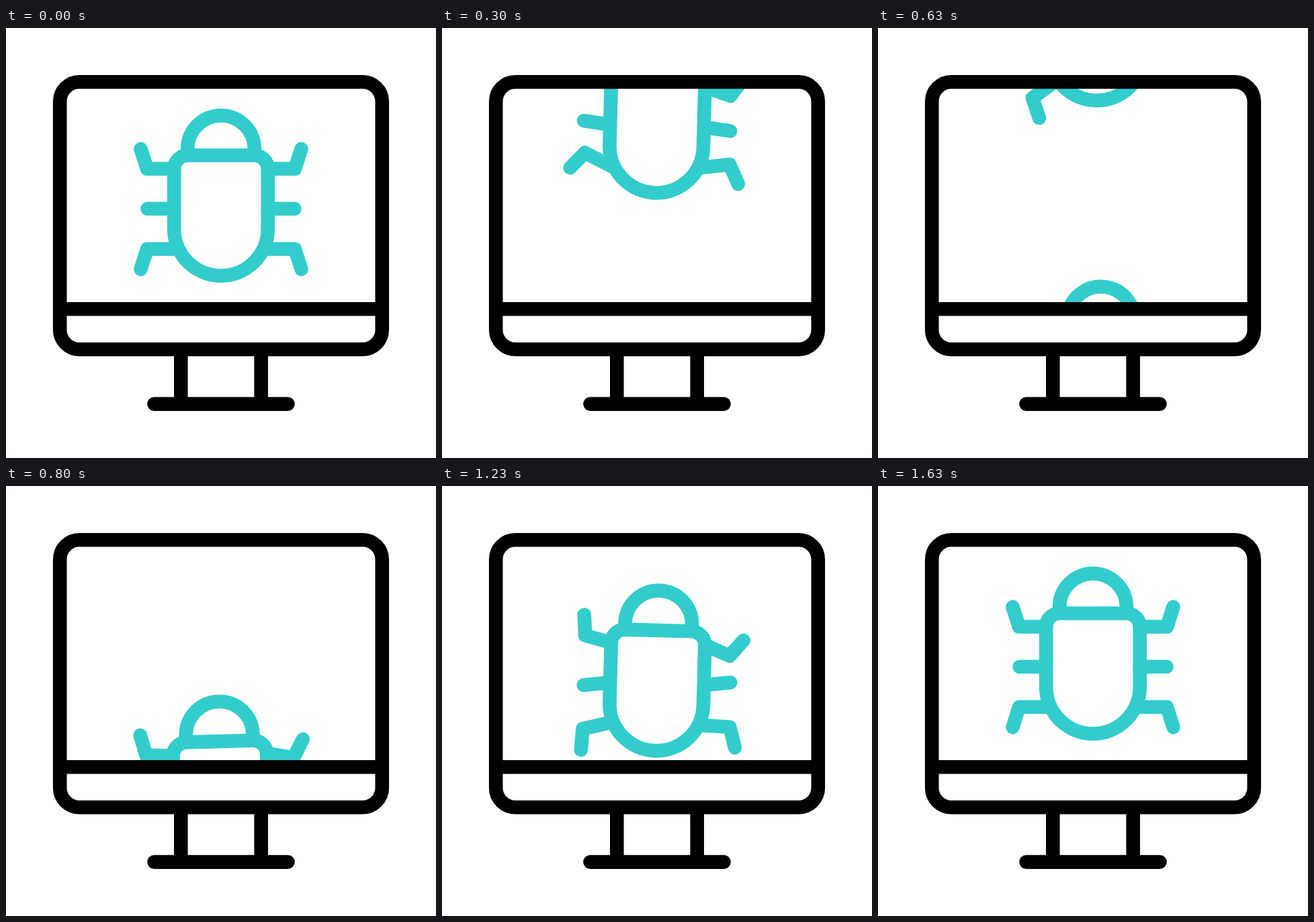
Animation of 640 by 640 pixels, one loop 1670 ms. Source, as an HTML page:

```html
<!DOCTYPE html>
<html lang="en">
<head>
<meta charset="utf-8">
<title>Bug on a monitor</title>
<style>
  html, body { margin: 0; width: 100%; height: 100%; overflow: hidden; background: #fff; }
  svg { display: block; width: 100vw; height: 100vh; }
  path, rect { fill: none; stroke-width: 20.6; }
</style>
</head>
<body>
<svg viewBox="0 0 640 640">
  <clipPath id="screen"><rect x="80" y="80" width="480" height="338"/></clipPath>
  <g clip-path="url(#screen)">
    <g id="bug" stroke="#3cc" stroke-linecap="round" stroke-linejoin="round">
      <path class="leftTop" d="M250 209.500H210L200.500 180"/>
      <path class="leftMid" d="M250 269H210.500"/>
      <path class="leftLow" d="M255 329H210L200.500 359"/>
      <path class="rightTop" d="M390 209.500H430L439.500 180"/>
      <path class="rightMid" d="M390 269H429.500"/>
      <path class="rightLow" d="M385 329H430L439.500 359"/>
      <path d="M250.200 209.500a20 20 0 0 1 20-20h99.600a20 20 0 0 1 20 20v89.500a69.800 69.800 0 0 1-139.600 0z"/>
      <path stroke-linecap="butt" d="M270.200 189.500v-9.500a49.800 49.800 0 0 1 99.600 0v9.500"/>
    </g>
  </g>
  <g stroke="#000">
    <rect x="80.200" y="80.200" width="479.600" height="398" rx="29"/>
    <path d="M80 418.300H560M260.300 478V559M379.700 478V559"/>
    <path stroke-linecap="round" d="M220.500 559.600H419.500"/>
  </g>
</svg>
<script>
const LOOP = 1670;
const TRAVEL = 39;

// How each leg swings about its joint: a period in steps and amplitudes of its harmonics.
const legs = {
  leftTop: { pivot: "250 209.5", period: 28, amps: [16.7, -7.5, 0, 12.9] },
  leftMid: { pivot: "250 269", period: 14, amps: [-9] },
  leftLow: { pivot: "250 329", period: 28, amps: [8.4, -23] },
  rightTop: { pivot: "390 209.5", period: 28, amps: [10.5, 6.2, 0, 13.2] },
  rightMid: { pivot: "390 269", period: 14, amps: [-9] },
  rightLow: { pivot: "390 329", period: 19, amps: [-18.5, 14] }
};

const swing = (step, { period, amps }) => amps.reduce(
  (sum, amp, i) => sum + amp * Math.sin(2 * Math.PI * (i + 1) * step / period), 0);

// Triangle wave between -1 and 1, starting at 0 and rising.
const triangle = cycles => 2 / Math.PI * Math.asin(Math.sin(2 * Math.PI * cycles));

const bodyTilt = step => -10.6 * triangle(Math.max(0, step - 1.5) / 14);

const leaving = document.getElementById("bug");
const arriving = leaving.cloneNode(true);
arriving.removeAttribute("id");
leaving.after(arriving);

function pose(bug, step, y, tilt) {
  bug.setAttribute("transform", `translate(0 ${y}) rotate(${tilt} 320 269)`);
  for (const [name, leg] of Object.entries(legs)) {
    bug.querySelector("." + name).setAttribute("transform", `rotate(${swing(step, leg)} ${leg.pivot})`);
  }
}

function draw() {
  // 30 steps per second, each starting on a 10 ms tick.
  const ticks = Math.floor(performance.now() % LOOP / 10);
  const step = Math.floor((ticks + 0.34) * 0.3);
  const stepsLeft = Math.max(0, TRAVEL - step);
  pose(leaving, step, -13.7 * step, bodyTilt(step));
  pose(arriving, stepsLeft, 12.7 * stepsLeft, -bodyTilt(stepsLeft));
  requestAnimationFrame(draw);
}
draw();
</script>
</body>
</html>
```
